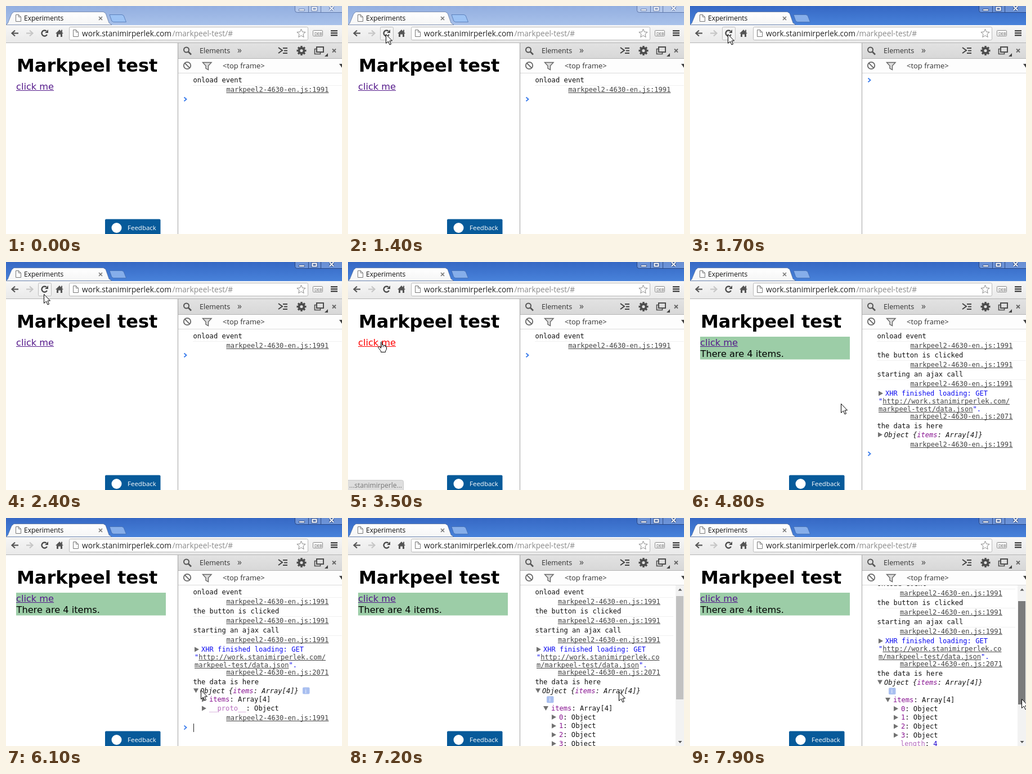
Recreate the animation shown at these times as an HTML page with a canvas. Size 597x406 px, loop 8 s.

```html
<!DOCTYPE html>
<html lang="en">
<head>
<meta charset="utf-8">
<title>Console walkthrough</title>
<style>
  html, body { margin: 0; width: 100%; height: 100%; overflow: hidden; background: #fff; }
  canvas { display: block; }
</style>
</head>
<body>
<canvas id="stage" width="597" height="406"></canvas>
<script>
const ctx = document.getElementById('stage').getContext('2d');
const LOOP = 8000, STEP = 100;

const ui = size => `${size}px "Open Sans", sans-serif`;
const page = (size, weight = '') => `${weight} ${size}px "DejaVu Sans", sans-serif`;
const MONO = '12.1px "DejaVu Sans Mono", monospace';
const ITALIC = 'italic ' + MONO;
const CHAR = 7.285;

const INK = '#111', VIOLET = '#881391', PALE_VIOLET = '#b56bbd', BLUE = '#0d0df0', LINK = '#444', ICON = '#555';
const SITE = 'work.stanimirperlek.com', PATH = '/markpeel-test/';

// Pointer keyframes: time, x, y
const POINTER = [
  [400, 552, 93], [600, 447, 107], [700, 370, 113], [800, 288, 105], [900, 155, 86],
  [1000, 122, 75], [1100, 88, 63], [1200, 67, 50], [2300, 67, 50], [2400, 67, 57],
  [2500, 66, 72], [2600, 64, 95], [2700, 61, 120], [2900, 58, 141], [4200, 58, 141],
  [4300, 75, 150], [4600, 192, 197], [4700, 238, 232], [4800, 268, 252], [5100, 315, 304],
  [5200, 318, 308], [5600, 337, 303], [6000, 337, 303], [6100, 346, 306], [6200, 351, 312],
  [6500, 351, 322], [6800, 351, 322], [6900, 365, 324], [7300, 520, 304], [7500, 573, 313],
  [7700, 588, 314], [7800, 588, 317], [7900, 589, 322]
];

function pointerAt(t) {
  if (t < POINTER[0][0]) return null;
  const next = POINTER.findIndex(k => k[0] > t);
  if (next < 0) return POINTER[POINTER.length - 1].slice(1);
  const [t0, x0, y0] = POINTER[next - 1], [t1, x1, y1] = POINTER[next];
  const p = (t - t0) / (t1 - t0);
  return [x0 + (x1 - x0) * p, y0 + (y1 - y0) * p];
}

function rect(x, y, w, h, color) {
  ctx.fillStyle = color;
  ctx.fillRect(x, y, w, h);
}

function box(x, y, w, h, r, fill, stroke, width) {
  ctx.beginPath();
  ctx.roundRect(x, y, w, h, r);
  paint(fill, stroke, width);
}

function paint(fill, stroke, width = 1) {
  if (fill) { ctx.fillStyle = fill; ctx.fill(); }
  if (stroke) { ctx.strokeStyle = stroke; ctx.lineWidth = width; ctx.stroke(); }
}

// Points are a flat "x y x y" string
function poly(points, fill, stroke, width, open) {
  const n = points.split(' ').map(Number);
  ctx.beginPath();
  for (let i = 0; i < n.length; i += 2) ctx.lineTo(n[i], n[i + 1]);
  if (!open) ctx.closePath();
  paint(fill, stroke, width);
}

function line(points, color, width = 1) { poly(points, null, color, width, true); }

function circle(x, y, r, fill, stroke, width) {
  ctx.beginPath();
  ctx.arc(x, y, r, 0, 7);
  paint(fill, stroke, width);
}

function gradient(y0, y1, top, bottom) {
  const g = ctx.createLinearGradient(0, y0, 0, y1);
  g.addColorStop(0, top);
  g.addColorStop(1, bottom);
  return g;
}

function text(str, x, y, font, color = INK) {
  ctx.font = font;
  ctx.fillStyle = color;
  ctx.fillText(str, x, y);
  return x + ctx.measureText(str).width;
}

function underlined(str, x, y, font, color) {
  const end = text(str, x, y, font, color);
  rect(x, Math.round(y) + 1, end - x, 1, color);
  return end;
}

function pageIcon(x, y, w, h) {
  poly(`${x} ${y} ${x + w - 4} ${y} ${x + w} ${y + 4} ${x + w} ${y + h} ${x} ${y + h}`, '#fff', '#777');
  line(`${x + w - 4} ${y} ${x + w - 4} ${y + 4} ${x + w} ${y + 4}`, '#777');
}

function cross(x, y, r, color, width) {
  line(`${x - r} ${y - r} ${x + r} ${y + r}`, color, width);
  line(`${x + r} ${y - r} ${x - r} ${y + r}`, color, width);
}

function drawTitleBar(focused) {
  const fill = focused ? gradient(0, 34, '#3668c4', '#4882da') : gradient(0, 34, '#93afe0', '#a8c1ea');
  const edge = focused ? 'rgba(20,45,100,.7)' : 'rgba(70,95,150,.75)';
  rect(0, 0, 597, 34, fill);
  box(513.5, -5, 90, 16.5, 4, 'rgba(255,255,255,.25)', edge);
  line('537.5 0 537.5 11', edge);
  line('559.5 0 559.5 11', edge);
  box(520.5, 5.5, 10, 3, 0, '#fff', edge);
  box(544.5, 2.5, 7, 5, 0, null, edge, 4);
  box(544.5, 2.5, 7, 5, 0, null, '#fff', 2);
  cross(578.5, 4, 3.5, edge, 4);
  cross(578.5, 4, 3.5, '#fff', 2);

  poly('184 15.5 206 15.5 209 17 213.5 28.5 191 28.5 188 27', focused ? '#86aeea' : '#9cc2f4', 'rgba(60,100,165,.65)');
  poly('-1 33.5 3 31 10 14 14 10.5 173 10.5 177 13 183 30 188 33.5', gradient(10, 34, '#fff', '#f5f5f5'), 'rgba(60,85,130,.55)');
  pageIcon(17.5, 15.5, 9, 12);
  text('Experiments', 32, 26, ui(12));
  cross(168, 22, 3, '#777', 1.6);
}

function arrow(x, dir, color) {
  line(`${x - 6 * dir} 48.5 ${x + 5 * dir} 48.5`, color, 2.2);
  line(`${x} 43.5 ${x + 5.5 * dir} 48.5 ${x} 53.5`, color, 2.2);
}

function drawToolbar(hoverReload) {
  rect(0, 34, 597, 32, gradient(34, 66, '#f6f6f6', '#e9e9e9'));
  rect(0, 65, 597, 1, '#b4b4b4');
  arrow(16, -1, ICON);
  arrow(42, 1, '#c6c6c6');
  if (hoverReload) box(57.5, 37.5, 23, 23, 2, '#f4f4f4', '#bdbdbd');
  ctx.beginPath();
  ctx.arc(68.5, 48.5, 5, 0.5, 5.4);
  paint(null, '#4a4a4a', 2.3);
  poly('75 42 75 48 69 48', '#4a4a4a');
  poly('95 42 102 49 100 49 100 55 97 55 97 50.5 93 50.5 93 55 90 55 90 49 88 49', ICON);
  rect(98, 42.5, 2, 4, ICON);

  box(112.5, 37.5, 424, 23, 2, '#fff', '#b9b9b9');
  pageIcon(119.5, 42.5, 9, 12);
  text(SITE, 135, 54, ui(13.7), '#222');
  text(PATH + '#', 295.5, 54, ui(13.7), '#8a8a8a');

  ctx.beginPath();
  for (let i = 0; i < 10; i++) {
    const a = -Math.PI / 2 + i * Math.PI / 5, r = i % 2 ? 3.6 : 8;
    ctx.lineTo(524.5 + r * Math.cos(a), 49 + r * Math.sin(a));
  }
  ctx.closePath();
  paint('#fff', '#8a8a8a');
  box(545.5, 43.5, 17, 10, 1, '#fafafa', '#888');
  text('DEB', 548, 51.5, ui(7), '#555');
  for (const y of [43, 47, 51]) rect(577, y, 12, 2.4, '#444');
}

function drawPage({ t, blank, loaded, feedback }) {
  rect(0, 66, 306, 340, '#fff');
  if (!blank) {
    if (loaded) rect(18, 133, 266, 40.5, '#9ccda7');
    text('Markpeel test', 19, 117, page(32, 'bold'), '#000');
    const pressed = t >= 3500 && t < 3700;
    underlined('click me', 18, 149, page(16.2), pressed ? '#f00' : '#551a8b');
    if (loaded) text('There are 4 items.', 18.5, 169, page(16.2), '#000');
  }
  if (feedback) {
    box(176, 379.5, 98.5, 30, 2, '#075a9a');
    circle(196.5, 395, 9, '#fff');
    text('Feedback', 216, 399, ui(11.5), '#fff');
  }
  if (t >= 3100 && t < 4300) {
    box(-3, 388.5, 101.5, 22, 3, '#dedede', '#c8c8c8');
    text('...stanimirperle...', 2, 402, ui(12), '#777');
  }
}

function drawGear(x, y) {
  for (let i = 0; i < 8; i++) {
    const a = i * Math.PI / 4, c = Math.cos(a), s = Math.sin(a);
    line(`${x} ${y} ${x + 8.5 * c} ${y + 8.5 * s}`, '#4c4c4c', 3.4);
  }
  circle(x, y, 6.4, '#4c4c4c');
  circle(x, y, 2.6, '#dedede');
}

function drawDevToolbars() {
  rect(306, 66, 291, 27, gradient(66, 93, '#e2e2e2', '#d8d8d8'));
  rect(306, 93, 291, 27, '#fdfdfd');
  rect(306, 93, 291, 1, '#b5b5b5');
  rect(306, 119, 291, 1, '#dadada');
  circle(320.5, 78, 4.5, null, ICON, 2);
  line('324 81.5 329 86.5', ICON, 2.6);
  text('Elements', 344, 84, ui(12.6), '#333');
  text('»', 411, 84, ui(16), '#444');
  line('484 74 491 79 484 84', '#444', 2);
  for (const [x, y] of [[492, 74], [494, 78.5], [492, 83]]) rect(x, y, 500 - x, 2, '#444');
  drawGear(525, 79.5);
  box(548.5, 76.5, 10, 9, 0, null, '#4c4c4c', 1.6);
  box(552, 73, 12, 9, 0, '#dedede', '#4c4c4c', 2);
  poly('572 84 572 90 566 90', '#444');
  cross(583, 79.5, 3, '#666', 1.8);

  circle(322, 106, 6.2, null, '#666', 1.8);
  line('317.7 101.7 326.3 110.3', '#666', 1.8);
  poly('349.5 100.5 365 100.5 359.5 106.5 359.5 113.5 355 111 355 106.5', '#ddd', '#666', 1.4);
  text('<top frame>', 385, 111, ui(13), '#333');
  poly('592 103 602 103 597 110', '#444');
}

function twisty(x, y, open) {
  poly(open ? `${x - 1} ${y - 4} ${x + 8} ${y - 4} ${x + 3.5} ${y + 4}`
            : `${x} ${y - 4.5} ${x + 8} ${y} ${x} ${y + 4.5}`, '#727272');
}

function drawConsole({ t, stage, expanded, scroll }) {
  rect(306, 120, 291, 286, '#fff');
  ctx.save();
  ctx.beginPath();
  ctx.rect(306, 120, 291, 286);
  ctx.clip();
  ctx.translate(0, -scroll);

  const narrow = expanded > 1;
  const right = narrow ? 555 : 573.5;
  let y = 132;
  const mono = (str, x, color) => text(str, x, y + 4, MONO, color);
  const source = lineNo => {
    const name = 'markpeel2-4630-en.js:' + lineNo;
    underlined(name, right - name.length * CHAR, y + 4, MONO, LINK);
    y += 17;
  };
  const log = str => {
    mono(str, 332.5);
    rect(332, y + 9, right + 23 - 332, 1, '#f0f0f0');
    y += 17;
    source(1991);
  };
  const property = (x, name, value, tint = VIOLET, valueTint = INK, open = false, leaf = false) => {
    if (!leaf) twisty(x - 13, y, open);
    const end = mono(name, x, tint);
    mono(': ', end);
    mono(value, end + 2 * CHAR, valueTint);
    y += 15.7;
  };

  if (stage > 0) log('onload event');
  if (stage > 1) { log('the button is clicked'); log('starting an ajax call'); }
  if (stage > 2) {
    twisty(335, y, false);
    mono('XHR finished loading: GET', 347, BLUE);
    y += 14;
    const url = `http://${SITE}${PATH}data.json`;
    const cut = narrow ? 29 : 31;
    underlined(url.slice(0, cut), mono('"', 335, BLUE), y + 4, MONO, LINK);
    y += 14;
    mono('".', underlined(url.slice(cut), 335, y + 4, MONO, LINK), BLUE);
    y += 13;
    source(2071);
    mono('the data is here', 332.5);
    y += 15.5;
    twisty(334, y, expanded > 0);
    let x = text('Object {', 345, y + 4, ITALIC);
    x = text('items', x, y + 4, ITALIC, VIOLET);
    text(': Array[4]}', x, y + 4, ITALIC);
    if (expanded) {
      if (narrow) y += 15.7;
      const badge = narrow ? 353 : 527;
      box(badge, y - 6, 12.5, 12, 2, '#a9bff0');
      text('i', badge + 4.6, y + 4, ui(10), '#fff');
      y += 15.7;
      property(361, 'items', 'Array[4]', VIOLET, INK, narrow);
      if (narrow) {
        for (let i = 0; i < 4; i++) property(375, String(i), 'Object');
        property(374, 'length', '4', PALE_VIOLET, '#1c00cf', false, true);
        property(375, '__proto__', 'Array[0]', PALE_VIOLET);
      }
      property(361, '__proto__', 'Object', PALE_VIOLET);
      y += 1.5;
    } else y += 17;
    source(1991);
  }
  line(`316.5 ${y - 3.5} 320.5 ${y} 316.5 ${y + 3.5}`, '#3b7ded', 1.9);
  if (expanded && Math.floor((t - 5800) / 500) % 2 === 0) rect(333, y - 7, 1, 15, '#222');
  ctx.restore();
  if (narrow) drawScrollbar(t, scroll);
}

function drawScrollbar(t, scroll) {
  rect(582, 120, 15, 286, '#f2f2f2');
  poly('586.5 129.5 590 125.5 593.5 129.5', '#555');
  poly('586.5 397 593.5 397 590 401', '#555');
  const color = t >= 7800 ? '#7b7b7b' : t >= 7600 ? '#a8a8a8' : '#c1c1c1';
  rect(583, 139 + scroll * 0.6, 13, 184, color);
}

function drawPointer(x, y, hand) {
  ctx.save();
  ctx.translate(Math.round(x) + 0.5, Math.round(y) + 0.5);
  ctx.lineJoin = 'round';
  if (hand) {
    poly('0 1 1 0 2 1 2 6 4 6 5 7 7 7 8 8 9 8 10 10 10 14 8 17 8 19 0 19 0 17 -4 12 -5 10 -3 9 0 12', '#fff', '#000');
    for (const gx of [2, 5, 8]) line(`${gx} 7 ${gx} 10`, '#000');
  } else {
    poly('0 0 0 16 4 12.5 6.5 18.5 9 17.5 6.5 11.5 11 11.5', '#fff', '#000');
  }
  ctx.restore();
}

function draw(time) {
  const t = Math.floor((time % LOOP) / STEP) * STEP;
  const between = (a, b) => t >= a && t < b;
  const stage = between(1600, 1800) ? 0 : t >= 3700 ? 3 : t >= 3600 ? 2 : 1;

  rect(0, 0, 597, 406, '#fff');
  drawTitleBar(t >= 1500);
  drawToolbar(between(1200, 2500));
  drawPage({ t, blank: between(1700, 1800), loaded: stage === 3, feedback: !between(1700, 1900) });
  drawConsole({
    t, stage,
    expanded: t >= 6700 ? 2 : t >= 5800 ? 1 : 0,
    scroll: t >= 7900 ? 15 : t >= 7800 ? 5 : 0
  });
  drawDevToolbars();
  rect(305, 66, 1, 340, '#a3a3a3');
  const pos = pointerAt(t);
  if (pos) drawPointer(pos[0], pos[1], between(2900, 4300));
}

const start = performance.now();
function tick() {
  draw(performance.now() - start);
  requestAnimationFrame(tick);
}
tick();
</script>
</body>
</html>
```
